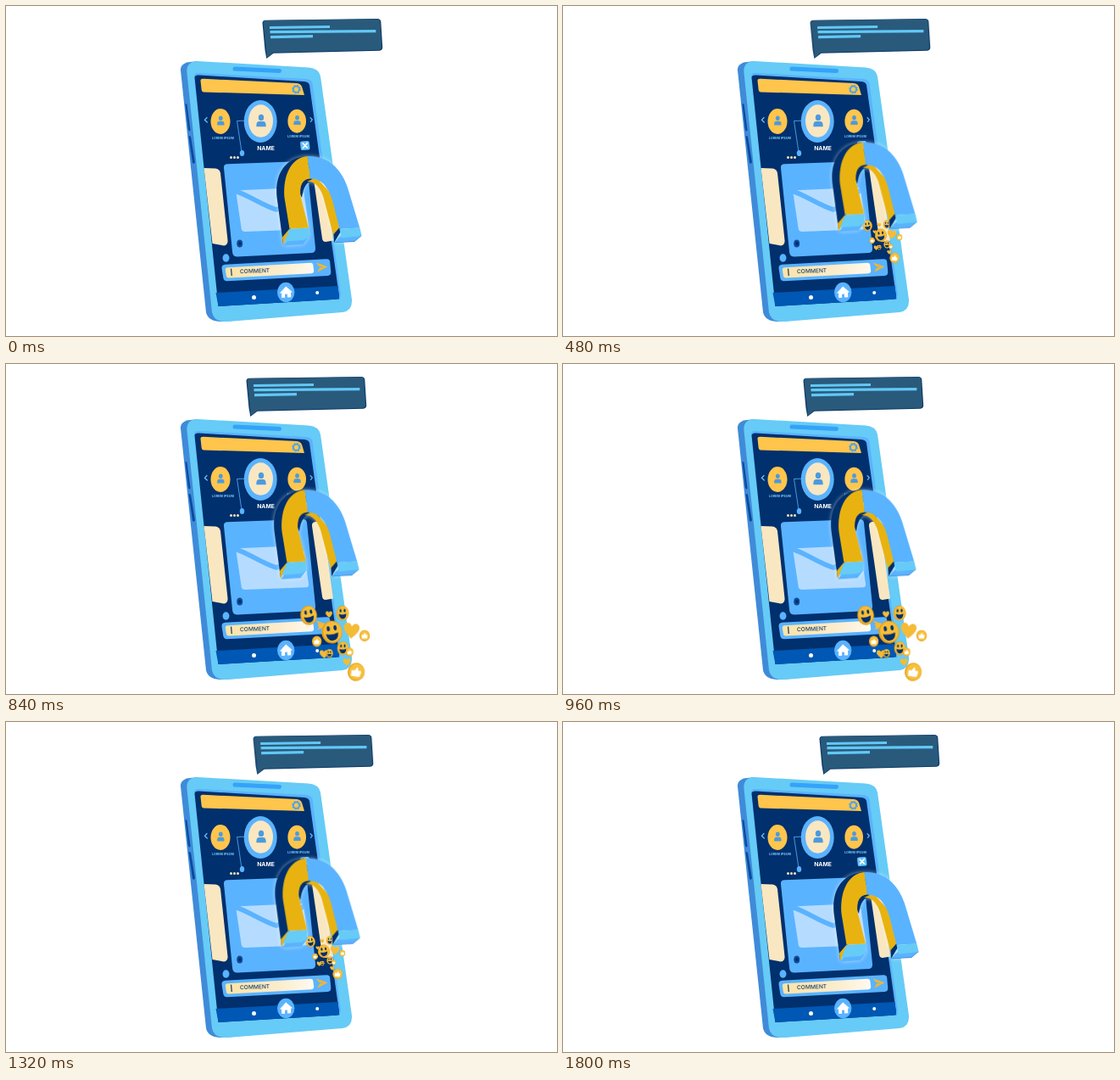
Recreate the animation shown at these times as an HTML page. Size 650 px wide and 389 px high, loop 1830 ms.

```html
<!DOCTYPE html>
<html lang="en">
<head>
<meta charset="utf-8">
<title>Social magnet</title>
<style>
  html, body { margin: 0; width: 100%; height: 100%; overflow: hidden; background: #fff; }
  svg { display: block; width: 650px; height: 389px; }
  text { font-family: Inter, "Open Sans", sans-serif; font-weight: 700; }

  :root {
    --body: #66cbf6; --sky: #5ab3ff; --side: #3f8bd9; --navy: #00306d;
    --gold: #e8b310; --yellow: #ffc54c; --cream: #f9e7c1;
  }
  .body { fill: var(--body); } .sky { fill: var(--sky); } .side { fill: var(--side); }
  .navy { fill: var(--navy); } .gold { fill: var(--gold); } .yellow { fill: var(--yellow); }
  .cream { fill: var(--cream); } .white { fill: #fff; }
  .line { fill: none; stroke-linecap: round; stroke-linejoin: round; }

  /* 30 steps out, 30 steps back, one step of rest */
  .bubble, .magnet, .likes { animation: 1830ms steps(30, end) infinite; }
  .bubble { animation-name: slide; }
  .magnet { animation-name: lift; }
  .likes { animation-name: burst; transform-origin: 362px 209px; }
  @keyframes slide {
    0%, 98.3607%, 100% { transform: translate(0, 0); }
    49.1803% { transform: translate(-20.4px, 0); }
  }
  @keyframes lift {
    0%, 98.3607%, 100% { transform: translate(0, 0); }
    49.1803% { transform: translate(-3.3px, -30.8px); }
  }
  @keyframes burst {
    0%, 98.3607%, 100% { transform: scale(0); }
    49.1803% { transform: scale(1.0714); }
  }
</style>
</head>
<body>
<svg viewBox="0 0 650 389">
  <defs>
    <g id="person">
      <circle cy="-3" r="3.1"/>
      <path d="M-5.5 6V4.5Q-5.5 .8-2 .8H2Q5.5 .8 5.5 4.5V6Z"/>
    </g>
    <g id="face">
      <circle r="10" fill="#e3a01f"/>
      <circle cx=".5" cy="-.3" r="8.9" fill="#f6bd38"/>
      <g class="navy">
        <ellipse cx="-3.2" cy="-3.2" rx="1.5" ry="2.2"/>
        <ellipse cx="3.4" cy="-3.4" rx="1.5" ry="2.2"/>
        <path d="M-6 1.2Q0 3 6 .8Q5.6 7.4 .2 7.5Q-5 7.5-6 1.2Z"/>
      </g>
    </g>
    <path id="heart" fill="#f4bb36" d="M1 10C-3 6-10 2-10-4C-10-10-2-11 0-5C2-11 10-10 10-4C10 2 4 6 1 10Z"/>
    <g id="coin">
      <circle r="10" fill="#eba928"/>
      <circle cx=".5" cy="-.3" r="8.8" fill="#f8c03c"/>
      <path class="white" d="M-5.5-1.5H-2L.5-5Q2.5-5 2-1.8H5Q6.3-1.2 5.8 0L5 4Q4.5 5 3.5 5H-5.5Z"/>
    </g>
    <linearGradient id="field">
      <stop offset="0" stop-color="#fde3a4"/>
      <stop offset=".6" stop-color="#fbeccb"/>
      <stop offset="1" stop-color="#fffaf0"/>
    </linearGradient>
  </defs>

  <!-- phone shell -->
  <path class="side" d="M206 76Q205 70 213 66.5L226 65L268 371L252 372Q238 371 236 361Z"/>
  <path d="M211.500 116Q211 114 213.500 116L217.500 146Q217 149 215 146ZM215.500 154Q216 152 218 154L223 184Q222 187 220 185Z" fill="#0a4a9f"/>
  <path class="body" d="M213.500 79Q212 65.500 226 65L357 72.500Q369 73.500 371 83L408 346Q409 359 397 361L262 372Q245 373 243 361Z"/>
  <path d="M270 74L322.500 76.500" class="line" stroke="#35a2fa" stroke-width="5"/>
  <path class="sky" d="M222 83Q222 78.500 228 79L354 86Q360.500 86.500 361.500 91L395 341Q395 345 390 345.500L251 354Z"/>
  <path class="navy" d="M222.500 84Q223 81 228 81.500L352 89Q357 89.500 358 93L393 342Q393 345 389 345.700L250.500 354Z"/>
  <path d="M247.500 338L391.500 330L393.300 345.400L250.500 354Z" fill="#0057b4"/>

  <!-- header -->
  <path class="yellow" d="M229.500 88Q229.500 85.500 233 85.800L343 91Q347.500 91.500 349 95L352 105L233 101.500Q231 101.300 230.700 99Z"/>
  <g transform="translate(342.500 98.200)">
    <circle r="3.6" fill="none" stroke="#4aa3ee" stroke-width="2"/>
    <circle r="4.700" fill="none" stroke="#4aa3ee" stroke-width="1.200" stroke-dasharray="1.850 1.850"/>
  </g>

  <!-- profiles -->
  <ellipse class="yellow" cx="253" cy="136" rx="11.500" ry="15"/>
  <ellipse class="yellow" cx="343.200" cy="135.700" rx="10.800" ry="14"/>
  <ellipse class="sky" cx="300.200" cy="136" rx="19.500" ry="25"/>
  <ellipse class="cream" cx="300.500" cy="135.500" rx="14.500" ry="19.300"/>
  <g fill="#4c9ade">
    <use href="#person" transform="translate(253.300 135) scale(.76 .9)"/>
    <use href="#person" transform="translate(343.500 134.500) scale(.76 .9)"/>
    <use href="#person" transform="translate(301 135) scale(1.020 1.200)"/>
  </g>
  <path class="line" d="M237 131.500L234.300 134.300L237.300 137M359 131.700L361.300 134L359.500 136.300" stroke="#6fc4ff" stroke-width="1.200"/>
  <path class="line" d="M281 135.200L272.500 135.500L278 172" stroke="#5ab3ff" stroke-width=".8"/>
  <ellipse class="sky" cx="278.500" cy="173.500" rx="2.700" ry="3.500"/>
  <g class="cream">
    <circle cx="265.500" cy="178.500" r="1.500"/>
    <circle cx="269.500" cy="178.500" r="1.500"/>
    <circle cx="273.500" cy="178.500" r="1.500"/>
  </g>
  <g font-size="3.700" fill="#7cc8ff" text-anchor="middle">
    <text x="256" y="157.200">LOREM IPSUM</text>
    <text x="345" y="155">LOREM IPSUM</text>
  </g>
  <text x="306.500" y="170.200" font-size="6.800" text-anchor="middle" class="white">NAME</text>
  <path d="M347 161.500Q347 159.500 349 159.500L356 159Q357.500 159 357.700 160.500L358.500 167.500Q358.500 169.300 357 169.500L349.500 170Q348 170 347.800 168.500Z" fill="#62c0f7"/>
  <path class="line" d="M350.300 162L355.300 167M355.200 161.700L350.500 167.300" stroke="#fff" stroke-width="1.700"/>

  <!-- cards -->
  <path class="cream" d="M233.500 191L247 191.500Q252 192 253 197L261.500 276Q262 282 257 282.500L243.500 280Z"/>
  <path class="cream" d="M361 191Q360.500 186.500 365 186L373.500 185.500L386 276.500L377 278Q373.500 278 373 274Z"/>
  <path class="sky" d="M257 191Q256.500 186.500 261.500 186.300L350 183Q354.500 183 355 187L365 285Q365.500 290.500 361 291L273 295.500Q268 295.500 267.200 291Z"/>
  <path d="M271.500 221Q271.500 217.500 275 217.200L347 214Q350.500 214 351 217L357 259Q357.500 263 354 263.300L282 266Q278.500 266 277.800 263Z" fill="#b5dcff"/>
  <path class="line" d="M272.500 219C286 223 304 236 319 240C332 236 342 224 350.500 217.500" stroke="#5ab3ff" stroke-width="5.500"/>
  <ellipse cx="275.700" cy="280" rx="3.500" ry="4.500" fill="#0d4b98"/>
  <ellipse cx="275.900" cy="280" rx="1.500" ry="2" fill="#04295d"/>

  <!-- comment field -->
  <ellipse class="sky" cx="259.500" cy="297" rx="4" ry="4.700"/>
  <path class="sky" d="M254.500 309Q254.300 305.200 258.500 304.800L378 298.300Q381.800 298.200 382.200 301.500L383.300 313.500Q383.500 317.500 379.500 318L261 324.200Q256.800 324.300 256.300 320.500Z"/>
  <path d="M258.800 311Q258.600 308.500 261.500 308.200L359 302.700Q362 302.600 362.300 305L363.200 312Q363.300 314.700 360.500 315.200L263 320.500Q260.200 320.500 259.900 318Z" fill="url(#field)"/>
  <path d="M265.500 309.500L266.300 318" stroke="#27466f" stroke-width="1.300"/>
  <text transform="translate(276 315.200) rotate(-2)" font-size="6.600" style="font-weight:500" fill="#17406f">COMMENT</text>
  <path d="M366.300 303L378.800 307.300L367.800 313L370.300 308.700L376 307.300L369.500 306.700Z" fill="#f1b733" stroke="#f1b733" stroke-width=".7"/>

  <!-- navigation -->
  <ellipse class="sky" cx="330.200" cy="337.500" rx="10.200" ry="11.700"/>
  <path class="white" d="M330.200 330.500L338 337.300L336 337.800L336.300 343.200L332 343.500L331.800 339.500L329 339.700L329.200 343.700L325.200 343.900L325 338.500L322.800 338.500Z"/>
  <circle class="white" cx="292.500" cy="343.500" r="2.500"/>
  <circle class="white" cx="367.200" cy="338" r="2"/>

  <g class="likes">
    <use href="#heart" transform="translate(381 295) scale(.4)"/>
    <use href="#heart" transform="translate(371.500 309) scale(.35)"/>
    <use href="#face" transform="translate(357 296.300) rotate(-8) scale(.98 1.150)"/>
    <use href="#face" transform="translate(397 293.700) scale(.74 .9)"/>
    <use href="#face" transform="translate(384.500 316) rotate(-6) scale(1.220 1.350)"/>
    <use href="#heart" transform="translate(407.300 314.300) rotate(8) scale(.92 .96)"/>
    <use href="#coin" transform="translate(423 320.300) scale(.62 .68)"/>
    <use href="#coin" transform="translate(366.600 327) scale(.57 .65)"/>
    <use href="#face" transform="translate(397.300 335) scale(.68 .82)"/>
    <use href="#coin" transform="translate(405.300 339.500) scale(.45 .52)"/>
    <use href="#heart" transform="translate(375 342) scale(.5)"/>
    <use href="#face" transform="translate(381.500 341) scale(.42 .5)"/>
    <use href="#heart" transform="translate(402 351.300) scale(.45)"/>
    <use href="#coin" transform="translate(413 363) rotate(8) scale(1 1.080)"/>
  </g>

  <g class="magnet" style="filter:drop-shadow(0 0 2.500px rgba(255,255,255,.55))">
    <!-- left side wall, inner wall -->
    <path class="navy" d="M327 281L319.500 225C317 200 328 179 354 177L358 190L340 230L336 264Z"/>
    <path class="navy" d="M347 222C346 211 350 203 358 202.500L364 205C355 207 351 212 349 226Z"/>
    <path class="gold" d="M355 207C364 206 370 213 374 224L387.500 275L394 263L386 224L366 202Z"/>
    <path class="navy" d="M387 279L386.500 269L393.500 261L396 264Z"/>
    <!-- arms -->
    <path class="gold" d="M355.500 177L359 203.500C350 204 346 211 347.500 224L357 261.500L334.500 262.800L328.500 226C326.500 200 336 179 355.500 177Z"/>
    <path class="sky" d="M355.500 177C378 176 395 190 403 214L417.300 261.500L393.500 263L385 229C380 212 371 203 359 203.500Z"/>
    <!-- tips -->
    <path class="gold" d="M327 281.500L326 272.500L334.500 262.500L334 270Z"/>
    <path class="sky" d="M327.500 282.500L333 274L358 271L350.500 281Z"/>
    <path class="body" d="M334.500 262.700L357 261.400L357.500 272.500L350.500 276L328.500 277.500Z"/>
    <path class="side" d="M387.500 279.300L393 273L419.500 271L411 278Z"/>
    <path class="sky" d="M388 278.500L395 271L419.500 270.500L411 277Z"/>
    <path class="body" d="M393.500 263L417.300 261.300L419.700 271L396 273.500Z"/>
  </g>

  <g class="bubble">
    <path d="M302.500 20Q302.500 17 306 16.800L438 15Q442 15 442.300 18.500L444.200 48.500Q444.300 52.500 440.500 52.700L315.500 55.800L307.300 62L305.500 52Z" fill="#0d3a66"/>
    <path d="M303.600 20.500Q303.500 17.300 307 17.100L437.500 15.400Q441 15.400 441.300 18.700L443 48Q443 51.600 439.500 51.800L315 54.800L308 61L307 52Z" fill="#295a7c"/>
    <g class="line" stroke="#62c8f5" stroke-width="3.200" style="stroke-linecap:butt">
      <path d="M311 25.500L382 24.500"/>
      <path d="M311.500 30.700L436.300 29.700"/>
      <path d="M312 36.600L362 35.700"/>
    </g>
  </g>
</svg>
</body>
</html>
```
